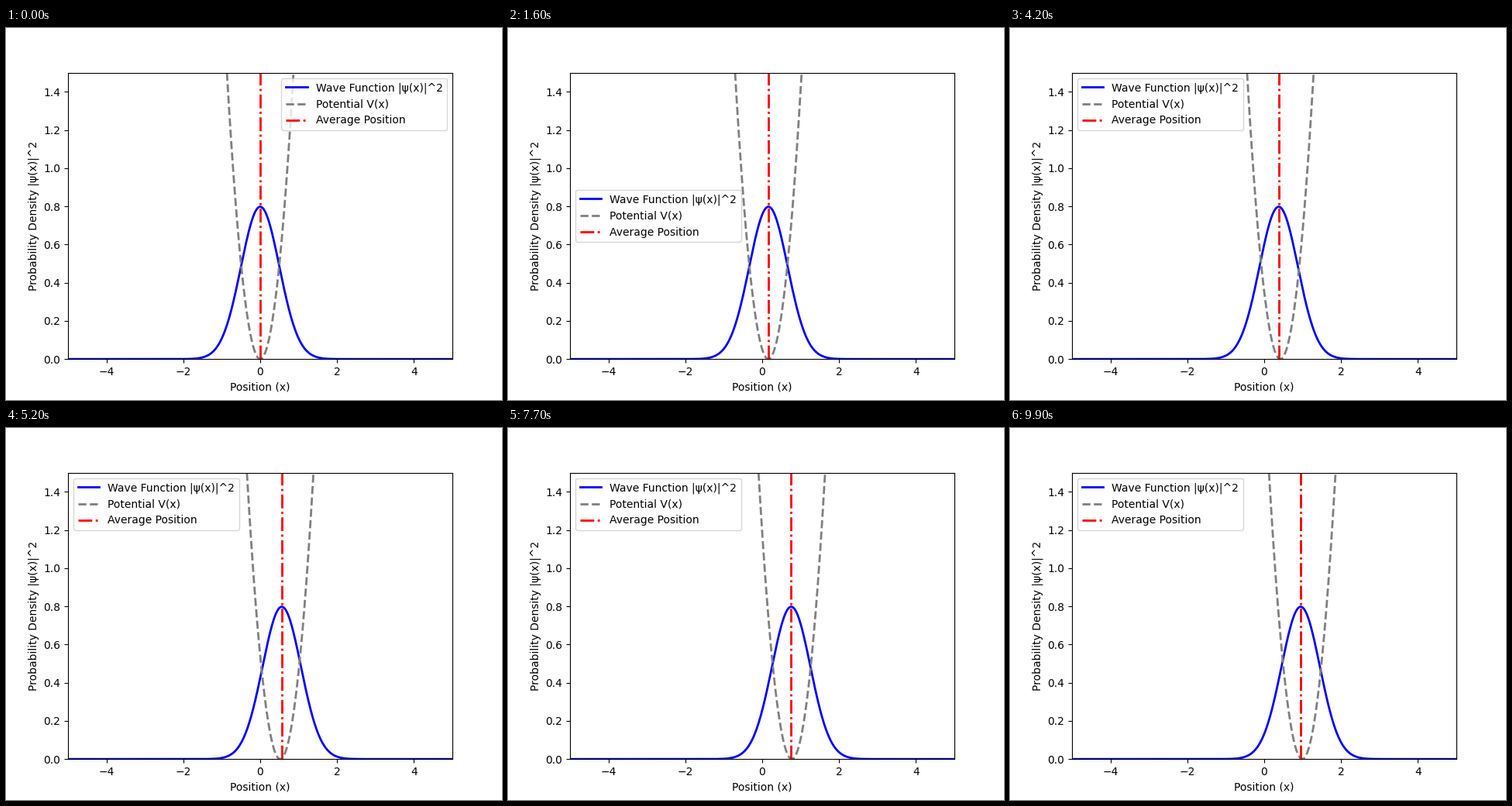
These frames come from a looping animation (640x480 px, 10000 ms). A matplotlib script:

```python
import numpy as np
import matplotlib.pyplot as plt
from matplotlib.animation import FuncAnimation

FRAMES = 100
DT = 0.1      # time step
OMEGA = 2.0   # oscillator frequency (m = hbar = 1)
SPEED = 0.1   # drift speed of the trap

x = np.linspace(-5, 5, 1000)


def trap_center(t):
    return SPEED * t


def mean_position(t):
    """Response of a packet at rest to a trap that starts moving."""
    return SPEED * t - SPEED / OMEGA * np.sin(OMEGA * t)


def potential(t):
    return 0.5 * OMEGA**2 * (x - trap_center(t))**2


def density(t):
    return np.sqrt(OMEGA / np.pi) * np.exp(-OMEGA * (x - mean_position(t))**2)


fig, ax = plt.subplots(figsize=(6.4, 4.8), dpi=100)
ax.set_xlim(-5, 5)
ax.set_ylim(0, 1.5)
ax.set_xlabel("Position (x)")
ax.set_ylabel("Probability Density |ψ(x)|^2")

wave, = ax.plot(x, density(0), color="blue", lw=2,
                label="Wave Function |ψ(x)|^2")
well, = ax.plot(x, potential(0), color="gray", ls="--", lw=2,
                label="Potential V(x)")
mean = ax.axvline(0, color="red", ls="-.", lw=2, label="Average Position")
ax.legend(loc="best")  # re-placed on every draw


def update(frame):
    t = frame * DT
    wave.set_ydata(density(t))
    well.set_ydata(potential(t))
    mean.set_xdata([mean_position(t)] * 2)
    return wave, well, mean


anim = FuncAnimation(fig, update, frames=FRAMES, interval=100,
                     repeat=True, repeat_delay=0, blit=False)
plt.show()
```
